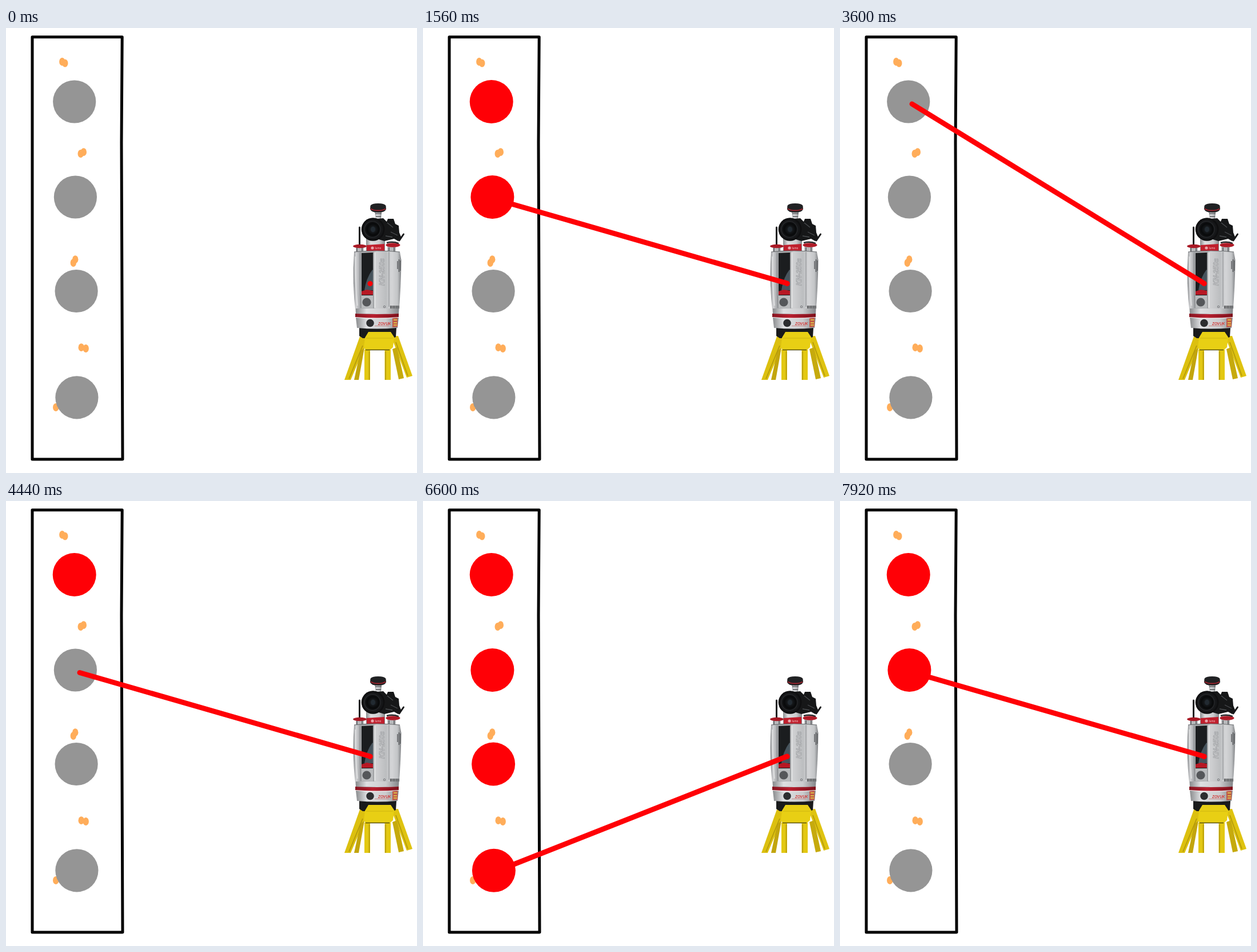
Animation of 719 by 779 pixels, one loop 8 s. Source, as an HTML page:

```html
<!DOCTYPE html>
<html lang="en">
<head>
<meta charset="utf-8">
<title>Laser scan</title>
<style>
html, body { margin: 0; width: 100%; height: 100%; overflow: hidden; background: #fff; }
svg { display: block; width: 100%; height: 100%; }
text { font-family: "Liberation Sans", Arial, sans-serif; }
</style>
</head>
<body>
<svg viewBox="0 0 719 779" xmlns="http://www.w3.org/2000/svg">
  <defs>
    <linearGradient id="steel">
      <stop offset="0" stop-color="#85878a"/><stop offset=".06" stop-color="#d3d4d6"/>
      <stop offset=".14" stop-color="#a3a5a8"/><stop offset=".4" stop-color="#b4b6b8"/>
      <stop offset=".48" stop-color="#cfd0d2"/><stop offset=".68" stop-color="#bcbec0"/>
      <stop offset=".8" stop-color="#d4d5d7"/><stop offset=".92" stop-color="#c3c5c7"/>
      <stop offset="1" stop-color="#808285"/>
    </linearGradient>
    <linearGradient id="rim">
      <stop offset="0" stop-color="#8a8c8e"/><stop offset=".25" stop-color="#dedfe1"/>
      <stop offset=".7" stop-color="#cbccce"/><stop offset="1" stop-color="#85878a"/>
    </linearGradient>
    <linearGradient id="band">
      <stop offset="0" stop-color="#861420"/><stop offset=".4" stop-color="#b81f2f"/>
      <stop offset="1" stop-color="#7d101b"/>
    </linearGradient>
    <radialGradient id="lens">
      <stop offset="0" stop-color="#22262a"/><stop offset=".5" stop-color="#08090a"/>
      <stop offset=".75" stop-color="#18191b"/><stop offset="1" stop-color="#0b0b0c"/>
    </radialGradient>
  </defs>

  <path d="M46 15.8H203.2L202 200L204 755H46Z" fill="none" stroke="#000" stroke-width="5" stroke-linejoin="round"/>
  <g id="specks" fill="#ffad5a"></g>

  <g id="tripod">
    <path d="M619 540L632 541L630 552L603 616H592Z" fill="#dcc00f"/>
    <path d="M620 565L627 560L617 616H609Z" fill="#c2a50d"/>
    <path d="M674 540L686 539L711 609L701 612Z" fill="#dfc310"/>
    <path d="M676 562L684 559L696 613L687 615Z" fill="#c6aa0d"/>
    <path d="M627 563H637V616H627Z" fill="#e3c812"/>
    <path d="M662.5 563H673V616H662.5Z" fill="#e3c812"/>
    <path d="M635.5 566V616M664 566V616M600 614L624 556M703 609L682 550" stroke="#b2980b" stroke-width="1.6"/>
    <path d="M618 525H683L682 541L676 543H624L618 539Z" fill="#191a1b"/>
    <path d="M634 532H673L679 541L677 559L671 564H629L626 559L628 542Z" fill="#e8cf14"/>
    <path d="M629 563.5H671" stroke="#59500a" stroke-width="1.6"/>
    <path d="M630 543H677" stroke="#cfb510" stroke-width="1.2"/>
  </g>

  <g id="head">
    <path d="M645 320H657L656 337H647Z" fill="url(#rim)"/>
    <path d="M646 325H657M647 330H656" stroke="#54575a" stroke-width="1.4"/>
    <path d="M637.5 311Q640 307 651 307T664.5 311L665 317Q663 323 651 323T637 317Z" fill="#202123"/>
    <path d="M638 316.5Q643 319.5 651 319.5T664 316.5" fill="none" stroke="#9c222c" stroke-width="2"/>
    <path d="M630 364H663V391H630Z" fill="url(#rim)"/>
    <path d="M650 334L660 333L666 339L668 334H678L681 343L687 346L688 358L692 368L686 373L679 369L662 373L652 370Z" fill="#161718"/>
    <path d="M667 341L677 349M673 357L685 363M664 364L676 366" stroke="#4a4d50" stroke-width="1.3"/>
    <circle cx="642" cy="352.5" r="20.3" fill="url(#lens)"/>
    <circle cx="641" cy="352.5" r="14" fill="none" stroke="#2a2c2f" stroke-width="1.2"/>
    <ellipse cx="642" cy="352.5" rx="4" ry="5" fill="#222a31"/>
    <path d="M618.5 349V380M688 372L695.5 361" stroke="#17181a" stroke-width="3" stroke-linecap="round"/>
    <path d="M612 383H626V393H612ZM667 382H682V393H667Z" fill="#b8babc"/>
    <path d="M614 385V392M623 385V392M670 384V392M679 384V392" stroke="#505255" stroke-width="1.5"/>
    <ellipse cx="619" cy="382" rx="12" ry="3.3" fill="#a91925"/>
    <ellipse cx="677" cy="380" rx="12.5" ry="3.8" fill="#b01b27"/>
    <path d="M666 376Q677 373 687 377" fill="none" stroke="#292a2c" stroke-width="2.4"/>
    <path d="M631 380L662 378V390L631 392Z" fill="#c01f2d"/>
    <circle cx="641" cy="385" r="2.6" fill="#e8a5aa"/>
    <text x="645.5" y="387" font-size="5" fill="#f3cdd0">lumo</text>
  </g>

  <g id="body">
    <path d="M609 392Q649 388 689 392L691.5 406Q691 455 687 501H612Q605 448 609 392Z" fill="url(#steel)"/>
    <path d="M609 392Q649 388 689 392" fill="none" stroke="#696b6e" stroke-width="1.2"/>
    <path d="M622 394L642 393V468H622Z" fill="#1b1d1f"/>
    <path d="M641 423Q630 438 627 459H642V424Z" fill="#47545d"/>
    <path d="M622 461L631 458L642 460V467H622Z" fill="#b71824"/>
    <path d="M619.5 394Q618.5 440 621 490M643 392V491M670 392V488" fill="none" stroke="#85878a" stroke-width="1"/>
    <path d="M644 393H647V490H644Z" fill="#dcddde"/>
    <path d="M611 400Q610 440 615 486" fill="none" stroke="#dfe0e1" stroke-width="1.6"/>
    <path d="M622 469H642V490H622Z" fill="#b9bbbd"/>
    <circle cx="631" cy="480" r="7.6" fill="#55575a"/>
    <text transform="translate(662 451) rotate(-90)" font-size="12" font-weight="bold" font-style="italic" fill="#c6c7c9" stroke="#97999c" stroke-width=".6">KN-250s</text>
    <path d="M685 408V422M687.5 405V427M690 407V425" stroke="#4c4e50" stroke-width="1.3"/>
    <path d="M672 488.5H688" stroke="#484a4c" stroke-width="5" stroke-dasharray="1.6 .9"/>
    <circle cx="662" cy="488" r="1.7" fill="none" stroke="#67696c" stroke-width=".8"/>
    <path d="M612 491H687V500H612Z" fill="url(#rim)"/>
    <path d="M611 500Q649 502 687 500V506Q649 509 611 506Z" fill="url(#band)"/>
    <path d="M612 507Q649 510 687 507L685 525Q649 528 614 525Z" fill="url(#rim)"/>
    <circle cx="637" cy="516.5" r="6.8" fill="#2c2d2f"/>
    <text x="651" y="519.5" font-size="6.4" font-weight="bold" font-style="italic" fill="#d33a38">ZOVUK</text>
    <path d="M645 521.5H670" stroke="#c77673" stroke-width=".8"/>
    <path d="M676 508L685 507V523L676 524Z" fill="#c05a48"/>
    <path d="M678 511H684M678 516H684M678 520H684" stroke="#d9b94a" stroke-width="2"/>
  </g>

  <circle cx="637" cy="447.5" r="4.6" fill="#ff0006"/>
  <g id="under"></g>
  <g id="discs"></g>
  <g id="over"></g>
</svg>
<script>
const STEP = 120, LOOP = 8000, SHOT = 7, RED = "#ff0006", GREY = "#959595";
const source = [637, 447];
const discs = [[119.7, 129], [121.4, 296], [123.1, 460.5], [123.9, 646.8]];
const aims = [[126, 133], [129, 300.5], [127, 459], [121, 651]];
const specks = [[98.3, 59], [103.3, 61.7], [130.7, 220], [135.8, 217.2], [117.8, 411],
  [121.2, 405.2], [131.7, 559.2], [139.7, 561], [87.2, 664]];

const $ = id => document.getElementById(id);
function add(parent, tag, attrs) {
  const el = document.createElementNS("http://www.w3.org/2000/svg", tag);
  for (const k in attrs) el.setAttribute(k, attrs[k]);
  return parent.appendChild(el);
}

specks.forEach(([cx, cy]) => add($("specks"), "ellipse", { cx, cy, rx: 5.2, ry: 6.9 }));
const dots = discs.map(([cx, cy]) => add($("discs"), "circle", { cx, cy }));
const beam = add($("over"), "path", { stroke: RED, "stroke-width": 9, "stroke-linecap": "round" });

const mix = (a, b, u) => a.map((v, i) => v + (b[i] - v) * u);

// Each shot: pulse travels out, disc lights, beam clears, echo travels back.
function draw(ms) {
  const step = Math.floor((ms % LOOP) / STEP) % (SHOT * discs.length);
  const shot = Math.floor(step / SHOT), phase = step % SHOT;
  dots.forEach((d, i) => {
    const lit = i < shot || (i === shot && phase >= 3);
    d.setAttribute("fill", lit ? RED : GREY);
    d.setAttribute("r", lit ? 38 : 37.6);
  });
  const echo = phase > 3;
  const reach = [0, .5, 1, 1, 0, .5, 1][phase];
  const from = echo ? aims[shot] : source, to = echo ? source : aims[shot];
  beam.setAttribute("d", reach ? `M${from}L${mix(from, to, reach)}` : "");
  $(echo ? "under" : "over").appendChild(beam);
}

const start = performance.now();
function tick() {
  draw(performance.now() - start);
  requestAnimationFrame(tick);
}
tick();
</script>
</body>
</html>
```
